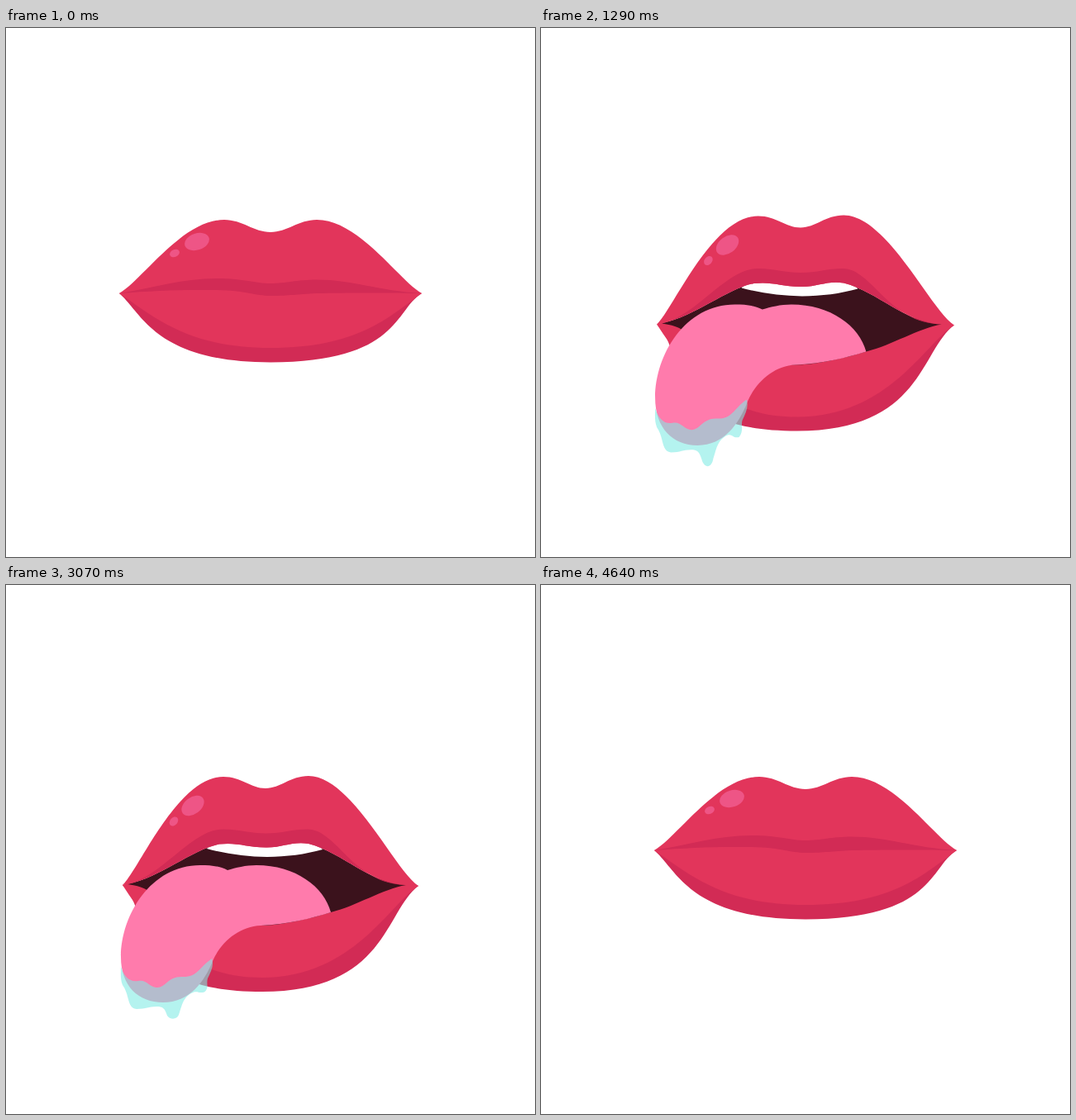
An HTML page for the animation above (5.43 s loop, 640 by 640 pixels).

```html
<!DOCTYPE html>
<html lang="en">
<head>
<meta charset="utf-8">
<title>Lips</title>
<style>
  html, body { margin: 0; height: 100%; overflow: hidden; background: #fff; }
  svg { display: block; width: 100vw; height: 100vh; }
  .lip { fill: #e2355b; }
  .shade { fill: #d22b55; }
  .shine { fill: #ee5586; }
  .wet { fill: rgb(128 235 228 / .59); }
</style>
</head>
<body>
<svg viewBox="0 0 640 640">
  <path id="lower" class="shade"/>
  <path id="lowerLight" class="lip"/>
  <g id="inside">
    <path id="mouth" fill="#3b121c"/>
    <path id="teeth" fill="#fff"/>
  </g>
  <g id="tongueBox">
    <path id="tongue" fill="#ff7bac"/>
    <path id="saliva" class="wet"/>
  </g>
  <path id="upper" class="lip"/>
  <path id="upperShade" class="shade"/>
  <g id="shines">
    <ellipse id="shineBig" class="shine" rx="15.3" ry="10"/>
    <ellipse id="shineSmall" class="shine" rx="6.2" ry="4.5"/>
  </g>
  <g id="drops"></g>
</svg>
<script>
const LOOP = 5430, START = 290, END = 4640, STEP = 71.25;
const $ = id => document.getElementById(id);
const mix = (a, b, k) => a + (b - a) * k;

// Edge of the upper lip facing the mouth, right to left
const innerEdge = [
  '503,321 C440,320 410,320.5 376,321 C350,322 345,324 320,324 C300,324 290,317 250,317 C210,316.5 175,318 137,321',
  '484,363 C440,361 408,324 366,313 C345,310 335,318 314,317.5 C290,317 280,311 258,313.5 C225,320 190,352 147,362'
];

// Top of the lower lip, tucked behind the upper lip and the mouth
const tuck = [' C200,308 440,308 503,321 Z', ' C200,345 440,345 499,364 Z'];

// Each part: [closed, open]
const shapes = {
  upper: [
    'M137,321 C165,305 213,232 264,232 C286,232 300,247 320,247 C340,247 354,232 376,232 C427,232 475,305 503,321 L' + innerEdge[0] + ' Z',
    'M141,363 C160,346 207,232 263,232 C285,232 296,246 314,246 C332,246 344,231 366,231 C418,231 470,345 499,364 L' + innerEdge[1] + ' Z'
  ],
  upperShade: [
    'M137,321 C175,315 213,303 255,303 C290,303 300,309 320,309 C340,309 350,304.5 376,304.5 C420,304.5 450,318 503,321 L' + innerEdge[0] + ' Z',
    'M147,362 C190,352 225,295 263,295.5 C285,296 295,300.5 314,300.5 C335,300.5 345,295.5 365,295.5 C400,295.5 420,362 484,363 L' + innerEdge[1] + ' Z'
  ],
  lower: [
    'M503,321 C470,341 476,404 320,404.5 C180,404 165,345 137,321' + tuck[0],
    'M499,364 C458,395 460,492 310,492 C140,492 180,400 141,363' + tuck[1]
  ],
  lowerLight: [
    'M503,321 C463,350 425,387 320,387 C220,387 180,350 137,321' + tuck[0],
    'M499,364 C465,385 420,475 310,475 C250,475 200,455 141,363' + tuck[1]
  ],
  mouth: [
    'M' + innerEdge[0] + ' C150,319.5 160,319 172,318 C210,316 260,317 300,321 C320,324 350,322 390,321 C425,320 455,320 503,321 Z',
    'M' + innerEdge[1] + ' C160,364 166,366 172,370 C210,400 260,412 305,412 C335,412 365,404 393,396 C425,388 455,368 484,363 Z'
  ],
  teeth: [
    'M243,317 C280,318 350,318 383,318 L376,308 L250,308 Z',
    'M243,319 C290,332 340,332 383,320 L366,302 L258,302 Z'
  ]
};

const tongueShape = 'M393,396 C385,365 350,339 303,339 C290,339 278,342 268,345 C258,340 248,339 235,339 ' +
  'C175,339 139,400 139,450 C139,485 160,505 190,505 C222,505 240,480 250,455 C260,432 282,413 308,412 C340,411 370,403 393,396 Z';

const salivaShape = (c, r) => 'M139,462 C143,474 150,481 160,479 C170,477 174,487 183,487 C193,487 196,474 212,474 ' +
  `C232,475 232,464 249,452 C252,460 248,468 244,476 C242,482 246,488 240,${494 + r} C232,${496 + r} 232,490 224,494 ` +
  `C214,500 213,508 209,520 C207,${529 + c} 198,${529 + c} 195,521 ` +
  'C192,512 190,510 182,510 C172,510 170,513 158,513 C146,512 150,496 141,484 C138,476 139,470 139,462 Z';

const ease = {
  smooth: k => k * k * (3 - 2 * k),
  in: k => k * k,
  out: k => 1 - (1 - k) * (1 - k)
};

// time, open, scale x, scale y, shift y, tongue stretch, tongue out, easing into the key
const keys = [
  [220, 0, 1, 1, 0, 0, 0],
  [600, 0, 1.1, .912, -26.3, 0, 0, 'smooth'],
  [930, 1, .95, 1.05, 8, 9, 1, 'smooth'],
  [1290, 1, 1.005, 1, -4.5, 4.5, 1, 'smooth'],
  [1500, 1, 1.02, .985, 0, 0, 1, 'smooth'],
  [1900, 1, 1, 1, 0, 0, 1, 'smooth'],
  [3280, 1, 1, 1, 0, 0, 1, 'smooth'],
  [3565, 1, .95, 1.046, 13, 10, 1, 'smooth'],
  [3780, 0, 1.1, .91, -30, 0, 0, 'smooth'],
  [4140, 0, 1.071, .936, -4, 0, 0, 'in'],
  [4280, 0, .987, 1.03, 4, 0, 0, 'out'],
  [4640, 0, 1, 1, 0, 0, 0, 'smooth']
];

function poseAt(t) {
  const i = keys.findIndex(k => k[0] > t);
  if (i === 0) return keys[0].slice(1, 7);
  if (i < 0) return keys.at(-1).slice(1, 7);
  const a = keys[i - 1], b = keys[i];
  const k = ease[b[7]]((t - a[0]) / (b[0] - a[0]));
  return a.slice(1, 7).map((v, n) => mix(v, b[n + 1], k));
}

const split = s => s.match(/[A-Z]|[\d.]+,[\d.]+/g).map(p => p.includes(',') ? p.split(',').map(Number) : p);
for (const id in shapes) shapes[id] = shapes[id].map(split);

const trace = (from, to, k, place) => from.map((p, i) => typeof p === 'string' ? p :
  place(mix(p[0], to[i][0], k), mix(p[1], to[i][1], k)).map(v => v.toFixed(2)).join()).join(' ');

// start time, x, y
const drops = [[1430, 202, 527], [2150, 236, 497], [2570, 202, 527], [3140, 236, 497]].map(([start, x, y]) => {
  const el = document.createElementNS('http://www.w3.org/2000/svg', 'ellipse');
  el.setAttribute('class', 'wet');
  el.setAttribute('cx', x);
  el.setAttribute('rx', 5);
  el.setAttribute('ry', 7);
  $('drops').append(el);
  return { el, start, y };
});

function shine(id, open, a, b) {
  const [x, y, turn] = a.map((v, i) => mix(v, b[i], open));
  $(id).setAttribute('transform', `translate(${x} ${y}) rotate(${turn})`);
}

function draw(t) {
  const [open, sx, sy, dy, stretch, out] = poseAt(t);
  const oy = mix(321, 363, open);
  const place = (x, y) => [320 + (x - 320) * sx, oy + dy + (y - oy) * sy];
  for (const id in shapes) $(id).setAttribute('d', trace(...shapes[id], open, place));
  $('inside').style.display = open > 0 ? '' : 'none';

  const placeTongue = (x, y) => {
    y += stretch * Math.max(0, y - 412) / 93;
    return place(330 + (x - 330) * out, 380 + (y - 380) * out - 42 * (1 - open));
  };
  $('tongueBox').style.display = out > 0 ? '' : 'none';
  const phase = ((t - 1430 + 2280) % 1140) / 1140;
  const drip = -3 + 17 * phase ** 8;
  const put = (id, s) => { const p = split(s); $(id).setAttribute('d', trace(p, p, 0, placeTongue)); };
  put('tongue', tongueShape);
  put('saliva', salivaShape(drip, drip / 2));

  for (const d of drops) {
    const age = t - d.start;
    d.el.style.display = age > 60 && age < 420 ? '' : 'none';
    d.el.setAttribute('cy', d.y + .00106 * age * age);
  }

  $('shines').setAttribute('transform', `translate(320 ${oy + dy}) scale(${sx} ${sy}) translate(-320 ${-oy})`);
  shine('shineBig', open, [231, 258.5, -18], [226, 267, -37]);
  shine('shineSmall', open, [204, 272.5, -25], [203, 286, -50]);
}

const origin = performance.now();
function tick() {
  const t = (performance.now() - origin) % LOOP;
  const n = Math.floor((t - START + 8) / STEP);
  draw(n < 0 ? 0 : Math.min(END, START + n * STEP));
  requestAnimationFrame(tick);
}
tick();
</script>
</body>
</html>
```
